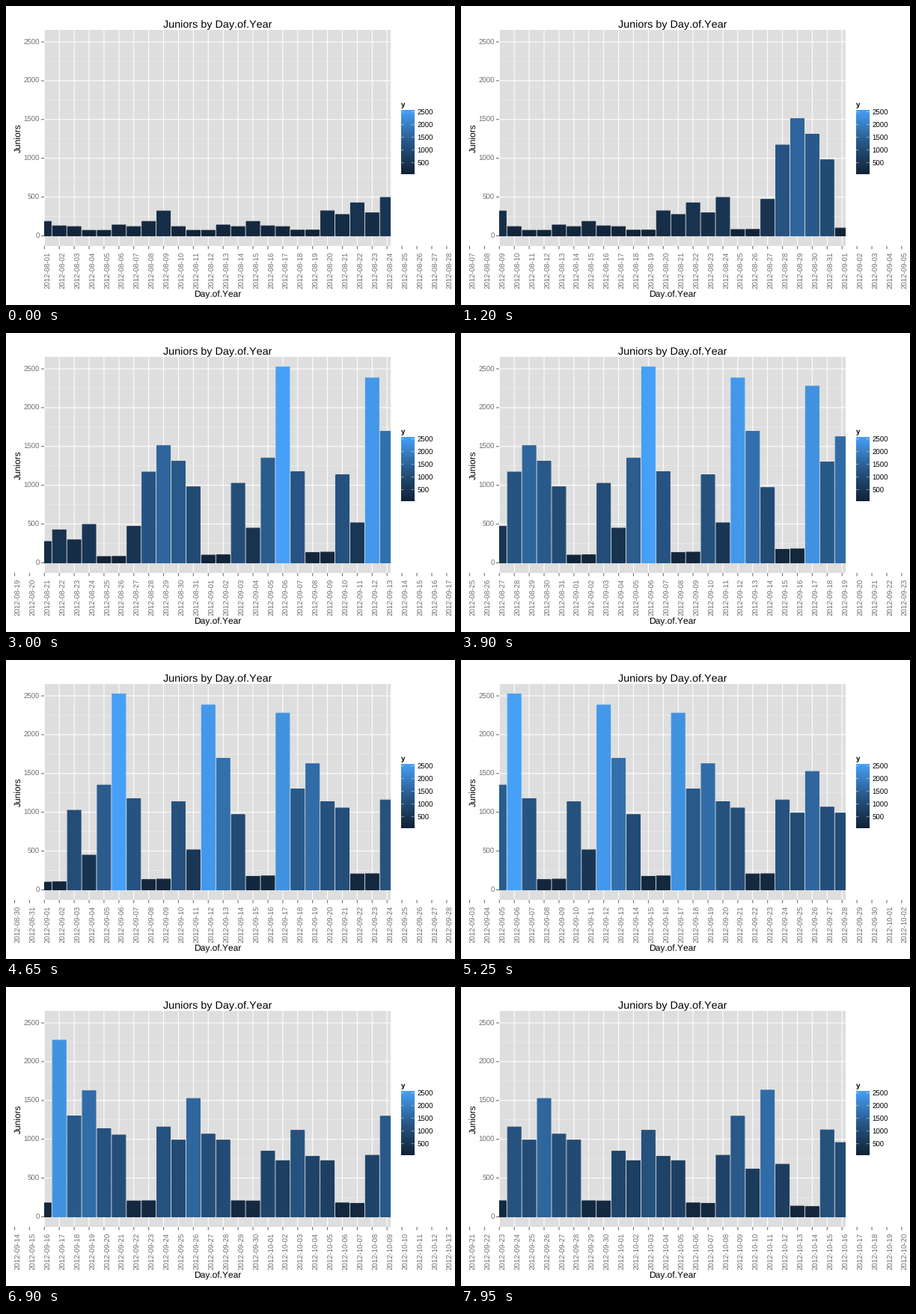
A matplotlib script that plays this animation: 600x400 px, repeating every 8 s.

```python
import numpy as np
import matplotlib.pyplot as plt
from matplotlib.animation import FuncAnimation
from matplotlib.colors import LinearSegmentedColormap, Normalize
from matplotlib.patches import Rectangle

plt.rcParams.update({"font.family": "Liberation Sans", "text.hinting": "none",
                     "text.kerning_factor": 6})

FIRST_DAY = np.datetime64("2012-08-01")  # a Wednesday
DAYS = 77
WEEK_LEVEL = [190, 190, 190, 430, 1515, 1355, 1500, 1630, 1530, 1120, 1050, 1480]
WEEKDAY_SHAPE = [0.76, 0.65, 1, 0.7, 0.65]
PEAKS = {8: 325, 23: 500, 26: 475, 27: 1175, 29: 1315, 34: 452, 36: 2530, 37: 1180,
         41: 520, 42: 2388, 43: 1700, 47: 2282, 48: 1305, 69: 1302, 70: 620, 71: 1638}

LEFT, RIGHT, TOP, BOTTOM = 51, 514, 32, 321
FIRST_X, STEP = 51.3, 19.91
BAR_WIDTH = 0.9 * STEP
ZERO_Y, UNIT = 307.5, 0.1038
VISIBLE_BARS = 24
SLOTS = range(-2, 28)

INTERVAL = 50
TICKS_PER_DAY = 3
FRAMES = 160

PANEL, MINOR, GREY = "#DEDEDE", "#EFEFEF", "#6E6E6E"
BLUES = LinearSegmentedColormap.from_list(
    "blues", [(17 / 255, 34 / 255, 54 / 255),
              (40 / 255, 88 / 255, 136 / 255),
              (70 / 255, 160 / 255, 247 / 255)])
scale = Normalize(50, 2530)


def count_on(day):
    """Weekly rhythm: quiet weekends, Wednesday highs and a few busy days."""
    week, weekday = divmod(day + 2, 7)
    if weekday > 4:
        return 75 + 140 * np.exp(-((day - 56) / 20) ** 2)
    return PEAKS.get(day, WEEK_LEVEL[week] * WEEKDAY_SHAPE[weekday])


COUNTS = [count_on(day) for day in range(DAYS)]

fig = plt.figure(figsize=(600 / 72, 400 / 72), dpi=72, facecolor="white")
ax = fig.add_axes([0, 0, 1, 1])


def y_of(value):
    return ZERO_Y - value * UNIT


def x_of(slot):
    return FIRST_X + slot * STEP


def line(x0, y0, x1, y1, color, width, z=1):
    return ax.plot([x0, x1], [y0, y1], color=color, lw=width, zorder=z,
                   solid_capstyle="butt", snap=False)[0]


def label(x, y, text, size=9.6, color="black", ha="left", rotation=0, **kw):
    return ax.text(x, y, text, fontsize=size, color=color, ha=ha, va="baseline",
                   rotation=rotation, rotation_mode="anchor", **kw)


panel = Rectangle((LEFT, TOP), RIGHT - LEFT, BOTTOM - TOP, fc=PANEL, lw=0, zorder=0)
ax.add_patch(panel)

# Grid and vertical axis
for value in range(250, 2500, 500):
    line(LEFT, y_of(value), RIGHT, y_of(value), MINOR, 0.53)
for value in range(0, 2501, 500):
    y = y_of(value)
    line(LEFT, y, RIGHT, y, "white", 1.07)
    line(46.9, y, LEFT, y, GREY, 1.07)
    label(44.6, y + 3.5, str(value), color=GREY, ha="right")
for slot in range(VISIBLE_BARS):
    line(x_of(slot), TOP, x_of(slot), BOTTOM, "white", 1.07).set_clip_path(panel)

# Titles
label(282.7, 29, "Juniors by Day.of.Year", 14.4, ha="center")
label(282.7, 390, "Day.of.Year", 12, ha="center")
label(19.5, 177, "Juniors", 12, ha="center", rotation=90)

# Colour legend
KEY_L, KEY_R, KEY_T, KEY_B = 528, 545.3, 139, 225
label(528, 135.3, "y", weight="bold")
ax.imshow(np.linspace(1, 0, 200)[:, None], cmap=BLUES, aspect="auto",
          extent=(KEY_L, KEY_R, KEY_B, KEY_T), interpolation="bilinear", zorder=1)
for value in range(500, 2501, 500):
    y = 226.8 - 0.034 * value
    line(KEY_L, y, KEY_L + 3.5, y, "white", 0.5, 2)
    line(KEY_R - 3.5, y, KEY_R, y, "white", 0.5, 2)
    label(549.7, y + 3.7, str(value))

# Scrolling parts
bars = []
for slot in range(VISIBLE_BARS):
    bar = Rectangle((x_of(slot) - BAR_WIDTH / 2, ZERO_Y), BAR_WIDTH, 0, lw=1.07,
                    joinstyle="round", snap=False, zorder=3)
    ax.add_patch(bar)
    bar.set_clip_path(panel)
    bars.append(bar)
ticks = [line(x_of(s), BOTTOM, x_of(s), BOTTOM + 4.3, GREY, 1.07) for s in SLOTS]
dates = [label(x_of(s) + 8, 329, "", color=GREY, ha="right", rotation=90)
         for s in SLOTS]

ax.set_xlim(0, 600)
ax.set_ylim(400, 0)
ax.axis("off")


def update(frame):
    start = frame // TICKS_PER_DAY
    for bar, count in zip(bars, COUNTS[start:]):
        bar.set_height(0.5 - count * UNIT)
        bar.set_color(BLUES(scale(count)))
    for slot, tick, date in zip(SLOTS, ticks, dates):
        day = start + slot
        tick.set_visible(day >= 0)
        date.set_text(str(FIRST_DAY + day) if day >= 0 else "")
    return bars + ticks + dates


anim = FuncAnimation(fig, update, frames=FRAMES, interval=INTERVAL,
                     repeat=True, repeat_delay=0, blit=False)
plt.show()
```
